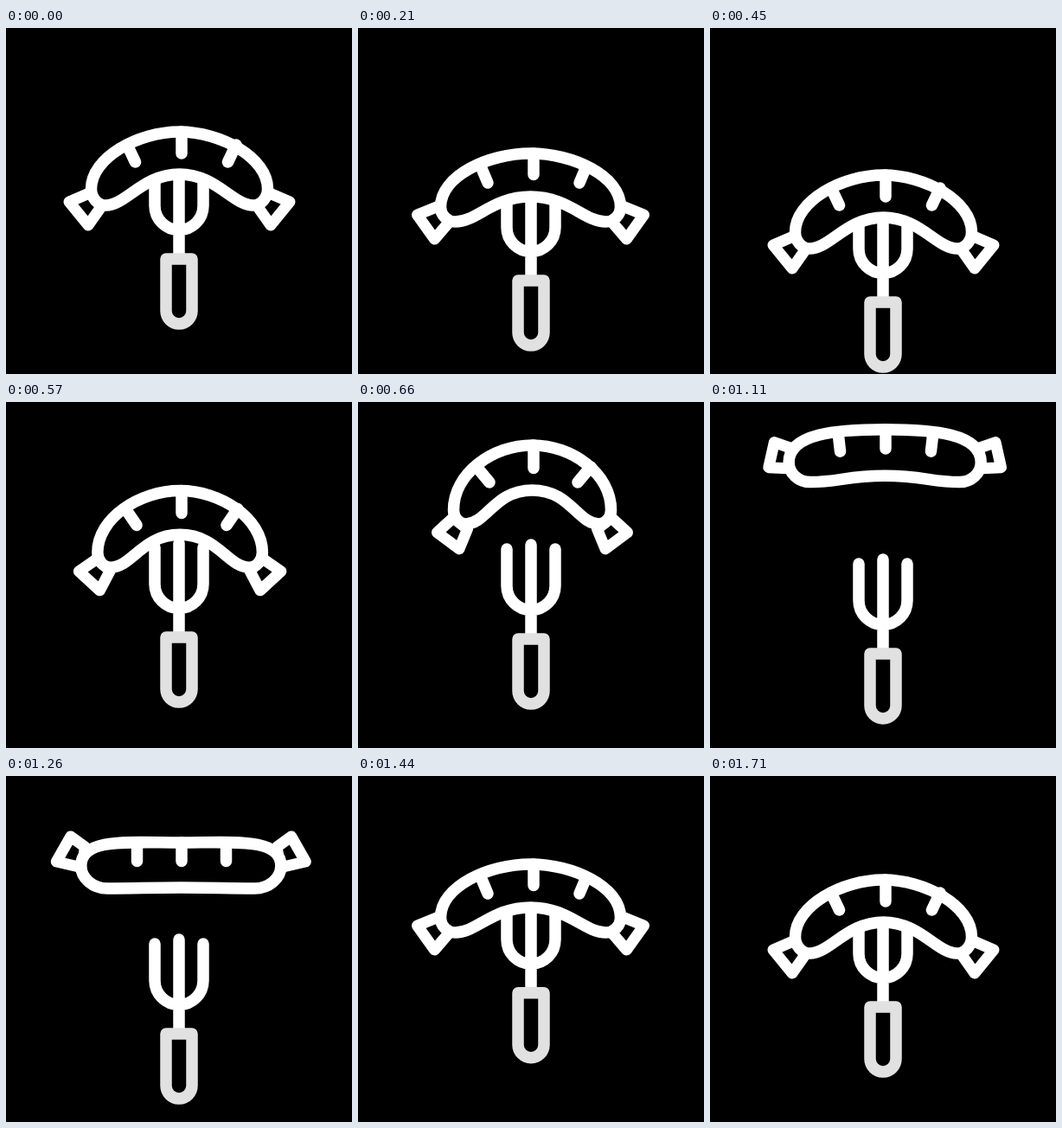
Recreate the animation shown at these times as an HTML page. Size 400 by 400 pixels, loop 1.74 s.

```html
<!DOCTYPE html>
<html>
<head>
<meta charset="utf-8">
<style>
html, body { margin: 0; width: 100%; height: 100%; overflow: hidden; background: #000; }
svg { display: block; width: 100%; height: 100%; }
path { fill: none; stroke: #fff; stroke-width: 13.5; stroke-linecap: round; stroke-linejoin: round; }
#body { fill: #000; }
#knots { stroke-width: 13; }
#handle { stroke: #e1e1e1; fill: #000; }
</style>
</head>
<body>
<svg viewBox="0 0 400 400">
  <g id="fork">
    <path d="M172 163V205.5a28 28 0 0 0 56 0V163M200 158V262"/>
    <path id="handle" d="M185 267H215V327a15 15 0 0 1-30 0Z"/>
  </g>
  <g id="sausage">
    <path id="knots"/>
    <path id="body"/>
    <path id="marks"/>
  </g>
</svg>
<script>
const LOOP = 1740, STEP = 30;
const $ = id => document.getElementById(id);

const ease = {
  sine: u => (1 - Math.cos(Math.PI * u)) / 2,
  quadIn: u => u * u,
  quadOut: u => 1 - (1 - u) ** 2,
  cubicOut: u => 1 - (1 - u) ** 3,
  fall: u => u ** 2.6
};

// Half outlines, relative to the middle of the upper edge:
// centre x | top handle, side handle, side x y | lobe x y, lobe handle, arch handle, arch y
// | knot corners | side mark, middle mark length
const rest = [200.5, 48, 36, 102, 66, 85, 85, 62, 42, 49,
  102, 70, 127.5, 81, 105.5, 108, 90, 86, 63, 15, 53.5, 35, 25];
const loose = [199.5, 49, 36, 104, 62, 87, 79, 62, 44, 50,
  104, 60, 131, 71, 111, 99, 93, 78, 61, 15, 53, 34, 24.5];
const bent = [201.5, 46, 42, 91, 75, 77, 91, 52, 44, 52,
  91.5, 84, 110, 101, 84.5, 120, 75, 97, 66, 25, 51, 43, 26.5];
const shallow = [202, 50, 34, 103.5, 57, 88, 74, 60, 50, 56,
  104, 50, 128.5, 52, 118, 81, 98, 73, 60, 15, 54, 32, 23.5];
const straight = [202.3, 60, 33, 115.5, 27, 85, 53, 50, 40, 52,
  111, 5, 127.5, -7, 144, 22, 114, 29, 51.5, 1, 51.5, 21.5, 21.5];

// Keys: time, value, easing towards that value
const forkKeys = [[0, 0], [420, 50, 'sine'], [450, 50, 'sine'], [540, 8, 'quadIn'],
  [570, 5, 'quadOut'], [660, 7, 'sine'], [900, 12, 'sine'], [1260, 31, 'sine'],
  [1380, -18, 'sine'], [1680, 0, 'sine'], [LOOP, 0, 'sine']];
const topKeys = [[0, 120], [420, 170, 'sine'], [450, 170, 'sine'], [540, 128, 'quadIn'],
  [900, 17, 'cubicOut'], [1260, 77, 'fall'], [1380, 100, 'quadOut'],
  [1680, 120, 'sine'], [LOOP, 120, 'sine']];
const poseKeys = [[0, rest], [210, loose, 'sine'], [420, rest, 'sine'], [450, rest, 'sine'],
  [660, bent, 'sine'], [900, shallow, 'sine'], [1260, straight, 'sine'],
  [1440, loose, 'sine'], [1680, rest, 'sine'], [LOOP, rest, 'sine']];

const mix = (a, b, u) => Array.isArray(a) ? a.map((v, i) => mix(v, b[i], u)) : a + (b - a) * u;

function at(keys, t) {
  const i = keys.findIndex(k => k[0] > t);
  const [t0, a] = keys[i - 1], [t1, b, name] = keys[i];
  return mix(a, b, ease[name]((t - t0) / (t1 - t0)));
}

const flip = ([x, y]) => [-x, y];

function drawSausage(pose, top) {
  const [cx, topH, sideH, sx, sy, lx, ly, lobeH, archH, arch,
    a, b, c, d, e, f, g, h, m, n, p, q, len] = pose;
  const half = [[0, 0], [topH, 0], [sx, sy - sideH], [sx, sy],
    [sx, mix(sy, ly, .55)], [mix(lx, sx, .55), ly], [lx, ly],
    [lobeH, ly], [archH, arch], [0, arch]];
  const ring = half.concat(half.slice(0, -1).reverse().map(flip));
  $('body').setAttribute('d', 'M' + ring[0] + 'C' + ring.slice(1).join(' '));

  const knot = [[a, b], [c, d], [e, f], [g, h]];
  $('knots').setAttribute('d', [knot, knot.map(flip)].map(k => 'M' + k.join('L') + 'Z').join(''));

  const mid = 203 - cx;
  $('marks').setAttribute('d',
    `M${mid} 0V${len}M${mid - m} ${n}L${mid - p} ${q}M${mid + m} ${n}L${mid + p} ${q}`);
  $('sausage').setAttribute('transform', `translate(${cx} ${top})`);
}

function frame() {
  const t = Math.floor(performance.now() % LOOP / STEP) * STEP;
  $('fork').setAttribute('transform', `translate(0 ${at(forkKeys, t)})`);
  drawSausage(at(poseKeys, t), at(topKeys, t));
  requestAnimationFrame(frame);
}
frame();
</script>
</body>
</html>
```
